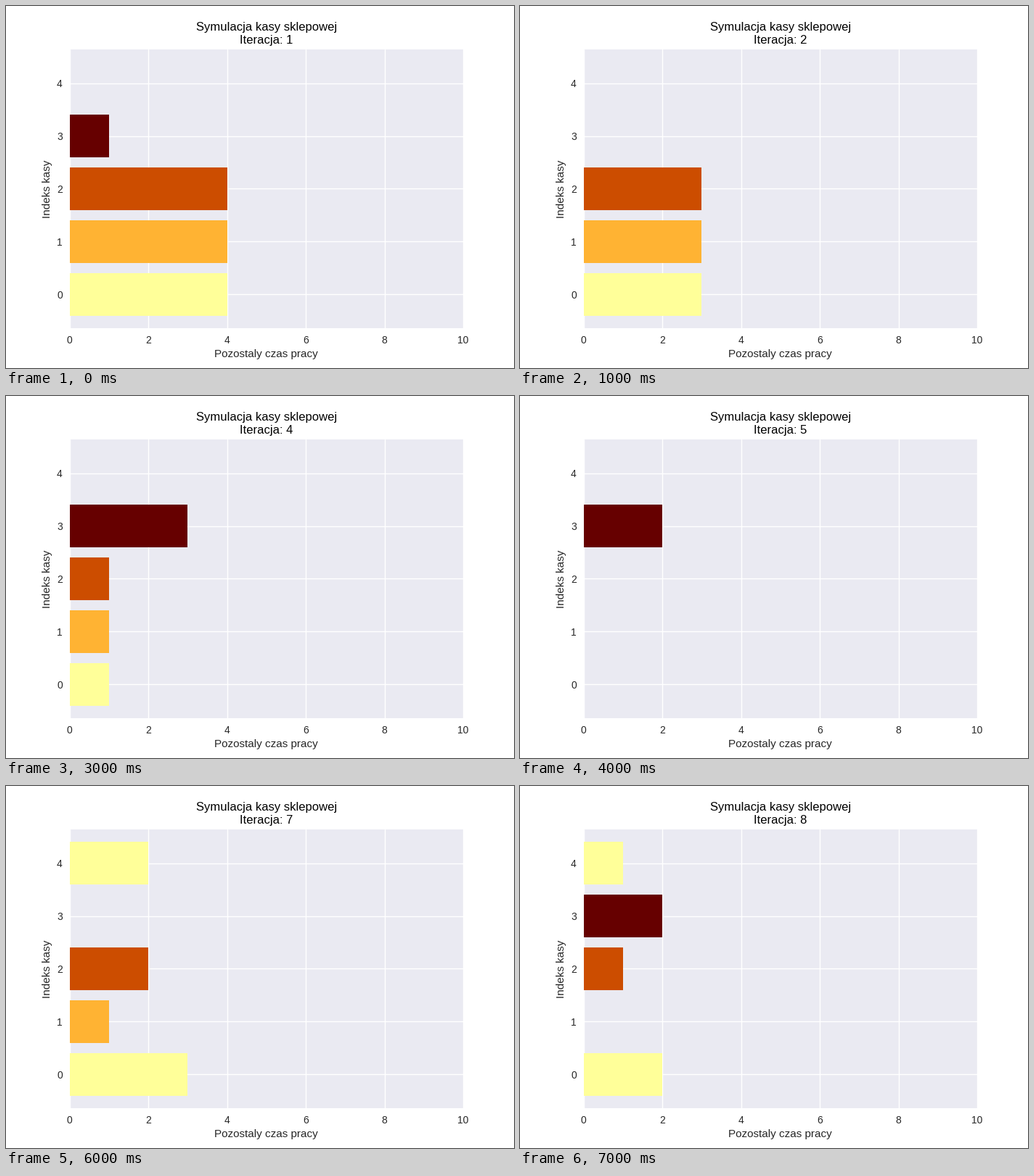
Recreate the animation shown at these times as a matplotlib script. Size 700 by 500 pixels, loop 8 s.

```python
import matplotlib.pyplot as plt
from matplotlib.animation import FuncAnimation

INK = "0.15"

plt.rcParams.update({
    "font.family": "Liberation Sans",
    "axes.facecolor": "#EAEAF2",
    "axes.edgecolor": "white",
    "axes.linewidth": 0,
    "axes.labelcolor": INK,
    "axes.labelsize": 11,
    "axes.titlesize": 12,
    "axes.titlecolor": "black",
    "axes.axisbelow": True,
    "axes.grid": True,
    "grid.color": "white",
    "grid.linestyle": "-",
    "grid.linewidth": 1,
    "lines.solid_capstyle": "round",
    "xtick.color": INK,
    "ytick.color": INK,
    "xtick.labelsize": 10,
    "ytick.labelsize": 10,
    "xtick.major.size": 0,
    "ytick.major.size": 0,
    "xtick.major.pad": 7,
    "ytick.major.pad": 7,
})

STEPS = 8
DESKS = 5

# (first iteration, service time) of each customer, per desk
CUSTOMERS = [
    [(1, 4), (6, 4)],
    [(1, 4), (7, 1)],
    [(1, 4), (6, 3)],
    [(1, 1), (3, 4), (8, 2)],
    [(7, 2)],
]


def time_left(desk, step):
    """Remaining service time at a desk; each iteration uses up one unit."""
    return sum(start + length - step
               for start, length in CUSTOMERS[desk]
               if start <= step < start + length)


fig = plt.figure(figsize=(7, 5), dpi=100, facecolor="white")
ax = fig.add_axes([0.125, 0.11, 0.775, 0.77])
shades = [plt.cm.afmhot(level) for level in (0.8, 0.6, 0.4, 0.2, 0.8)]
bars = ax.barh(range(DESKS), [0] * DESKS, height=0.8, color=shades)

ax.set_xlim(0, 10)
ax.set_ylim(-0.64, 4.64)
ax.set_xticks(range(0, 11, 2))
ax.set_yticks(range(DESKS))
ax.set_xlabel("Pozostaly czas pracy")
ax.set_ylabel("Indeks kasy")
title = ax.set_title("")


def update(frame):
    step = frame + 1
    for desk, bar in enumerate(bars):
        bar.set_width(time_left(desk, step))
    title.set_text(f"Symulacja kasy sklepowej\nIteracja: {step}")
    return [*bars, title]


anim = FuncAnimation(fig, update, frames=STEPS, interval=1000,
                     repeat=True, repeat_delay=0, blit=False)
plt.show()
```
